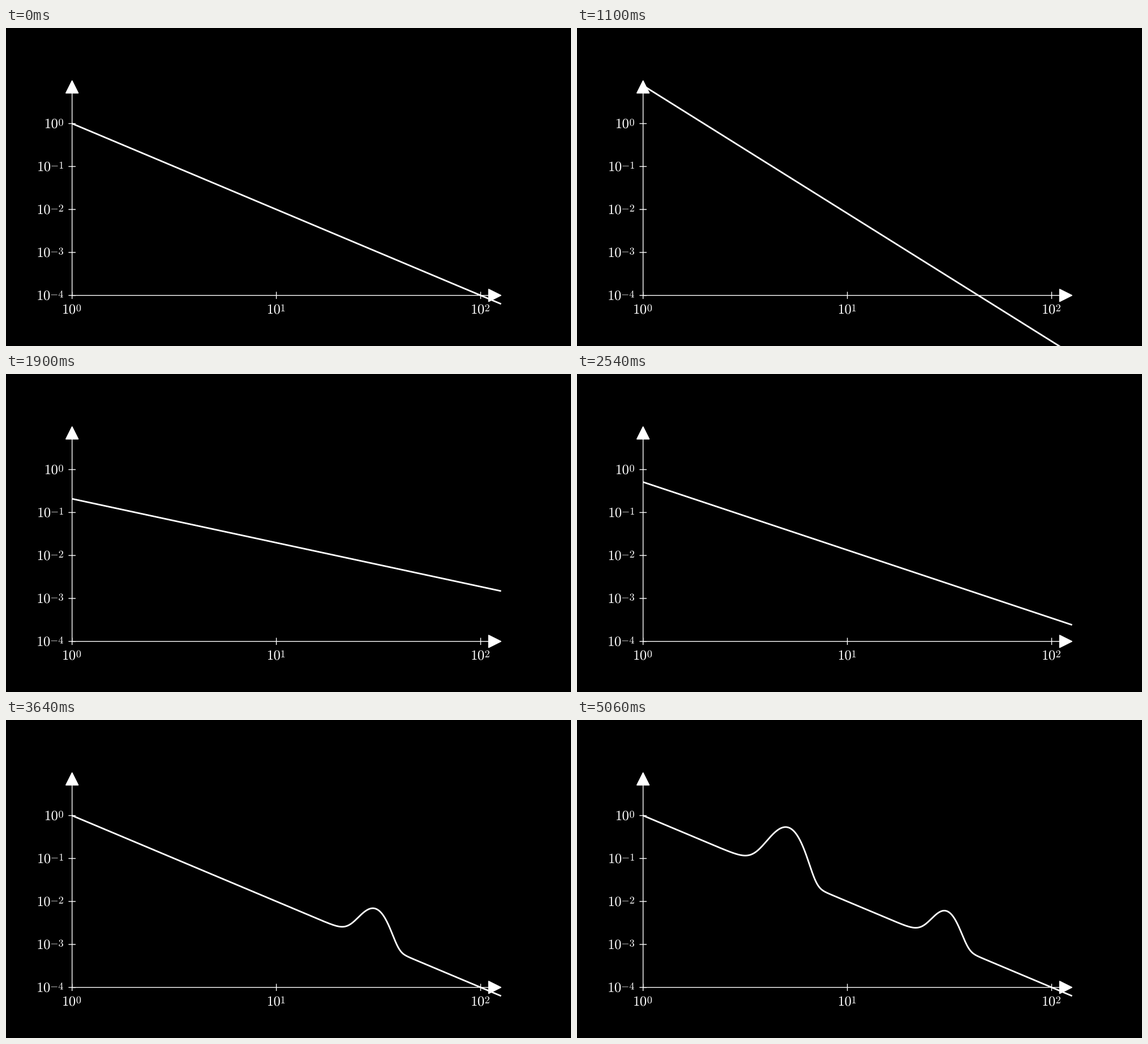
Animation of 998 by 561 pixels, one loop 6000 ms. Source, as a matplotlib script:

```python
import math

import matplotlib
import matplotlib.pyplot as plt
import numpy as np
from matplotlib.animation import FuncAnimation
from matplotlib.patches import PathPatch, Polygon
from matplotlib.textpath import TextPath
from matplotlib.transforms import Affine2D

matplotlib.rcParams["mathtext.fontset"] = "cm"

W, H, DPI = 998, 561, 100
FRAMES, INTERVAL = 300, 20
PX = 72 / DPI                      # one pixel in points

LEFT, BOTTOM = 116.7, 471.7        # axes origin (10^0, 10^-4)
DEC_X, DEC_Y = 360.87, 75.78       # pixels per decade
RIGHT, TOP = LEFT + 2.1 * DEC_X, BOTTOM - 5 * DEC_Y
TICK, TIP, LABEL_GAP = 6.3, 22.1, 15.8
EM, GLYPH_GAP, SUP_SCALE = 24.8, 2.27, 0.74
THIN, THICK = 1.4 * PX, 2.8 * PX

fig = plt.figure(figsize=(W / DPI, H / DPI), dpi=DPI, facecolor="black")
ax = fig.add_axes([0, 0, 1, 1])
ax.set_xlim(0, W)
ax.set_ylim(H, 0)
ax.axis("off")


def px_x(exponent):
    return LEFT + DEC_X * exponent


def px_y(exponent):
    return BOTTOM - DEC_Y * (exponent + 4)


def segment(x0, y0, x1, y1):
    ax.plot([x0, x1], [y0, y1], color="white", lw=THIN,
            solid_capstyle="butt", snap=False)


def arrow_tip(points):
    ax.add_patch(Polygon(points, closed=True, fc="white", ec="white",
                         lw=THIN, joinstyle="miter"))


def power_label(exponent, x, y, side):
    """Draw 10^exponent left of, or below, the point (x, y)."""
    sup = f"${{-}}{-exponent}$" if exponent < 0 else f"${exponent}$"
    glyphs = [TextPath((0, 0), "$1$", size=EM),
              TextPath((0, 0), "$0$", size=EM),
              TextPath((0, 0), sup, size=EM * SUP_SCALE)]
    boxes = [g.get_extents() for g in glyphs]
    width = sum(b.width for b in boxes) + 2 * GLYPH_GAP
    height = boxes[1].height
    if side == "left":
        pen, top = x - LABEL_GAP - width, y - height / 2
    else:
        pen, top = x - width / 2, y + LABEL_GAP
    for glyph, box in zip(glyphs, boxes):
        place = Affine2D().translate(-box.x0, -box.y1).scale(1, -1)
        place.translate(pen, top)
        ax.add_patch(PathPatch(place.transform_path(glyph), fc="white", lw=0))
        pen += box.width + GLYPH_GAP


# Axes
segment(LEFT, BOTTOM, RIGHT - TIP, BOTTOM)
segment(LEFT, BOTTOM, LEFT, TOP + TIP)
arrow_tip([(RIGHT, BOTTOM), (RIGHT - TIP, BOTTOM - TIP / 2),
           (RIGHT - TIP, BOTTOM + TIP / 2)])
arrow_tip([(LEFT, TOP), (LEFT - TIP / 2, TOP + TIP),
           (LEFT + TIP / 2, TOP + TIP)])
for e in range(3):
    segment(px_x(e), BOTTOM - TICK, px_x(e), BOTTOM + TICK)
    power_label(e, px_x(e), BOTTOM, "below")
for e in range(-4, 1):
    segment(LEFT - TICK, px_y(e), LEFT + TICK, px_y(e))
    power_label(e, LEFT, px_y(e), "left")

# Curves, one shape per second
log_x = np.linspace(0, 2.1, 800)
x = 10 ** log_x
near_bump = np.exp(-(x - 5) ** 2)
far_bump = np.exp(-(x - 30) ** 2 / 25)
stages = [px_y(np.log10(y)) for y in (
    x ** -2,
    8 * x ** -3,
    0.2 * x ** -1,
    x ** -2,
    x ** -2 + 0.01 * far_bump,
    x ** -2 + 0.005 * far_bump + 0.5 * near_bump,
)]
curve, = ax.plot(px_x(log_x), stages[0], color="white", lw=THICK,
                 solid_capstyle="butt", solid_joinstyle="round", zorder=5)


def sigmoid(t):
    return 1 / (1 + math.exp(-t))


def smooth(t):
    edge = sigmoid(-5)
    return (sigmoid(10 * (t - 0.5)) - edge) / (1 - 2 * edge)


def update(i):
    # The motion advances in sixtieths of a second, shown at 50 fps.
    step = max(0, (12 * i + 5) // 10)
    stage, part = divmod(step, 60)
    if stage >= len(stages) - 1:
        y = stages[-1]
    else:
        s = smooth(part / 60)
        y = (1 - s) * stages[stage] + s * stages[stage + 1]
    curve.set_ydata(y)
    return curve,


anim = FuncAnimation(fig, update, frames=FRAMES, interval=INTERVAL,
                     repeat=True, repeat_delay=0, blit=False)
plt.show()
```
